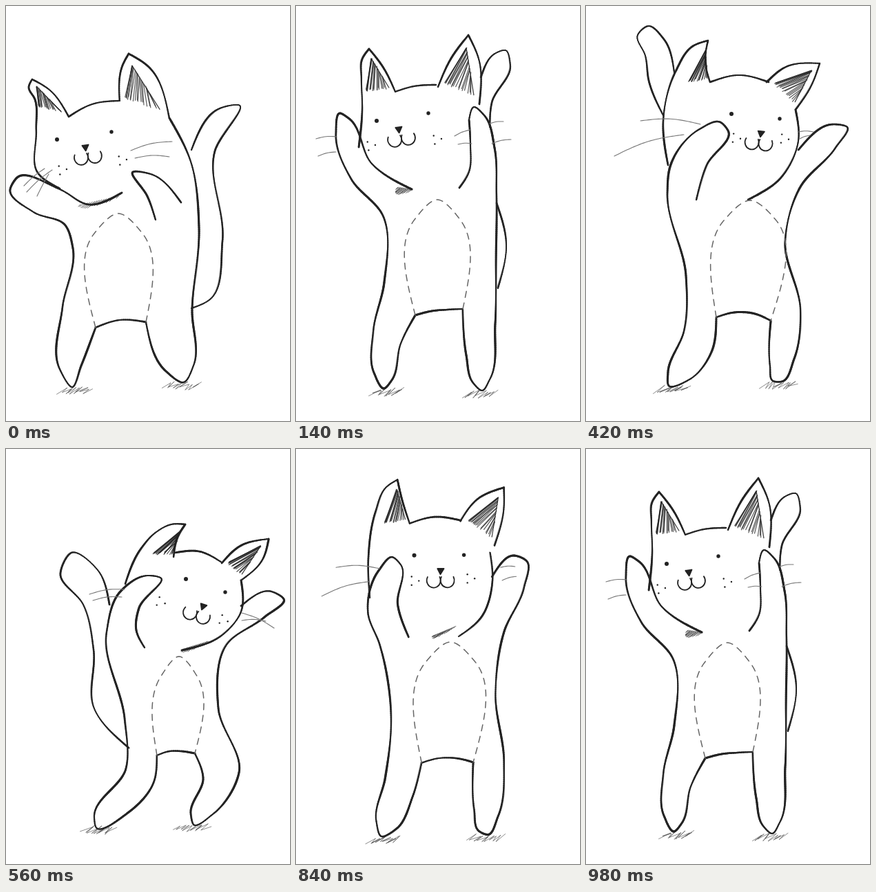
An HTML page with a canvas for the animation above (1120 ms loop, 412 by 600 pixels).

```html
<!DOCTYPE html>
<html lang="en">
<head>
<meta charset="utf-8">
<title>Dancing cat</title>
<style>
html, body { margin: 0; width: 100%; height: 100%; overflow: hidden; background: #fff; }
canvas { display: block; width: 412px; height: 600px; filter: blur(.5px); }
</style>
</head>
<body>
<canvas id="stage" width="412" height="600"></canvas>
<script>
const ctx = document.getElementById('stage').getContext('2d');
const STEP = 140;
const ORDER = [0, 1, 2, 3, 4, 3, 2, 1];
const INK = '#222';

// Key points "x,y"; strokes are separated by "|".
// head: cheek, ear, crown, ear, ear, jaw; left: crotch, then leg and arm
const leanLeft = pose({
  head: '78,264 46,241 44,180 42,135 33,117 38,106|38,106 64,122 91,160|91,160 125,142 165,137|165,137 169,86 178,69|178,69 207,88 237,162',
  left: '203,457 165,454 130,465|130,465 109,520 96,551 78,525 82,435 97,350 86,317 40,298 6,265 15,249 78,265 120,287 168,270',
  right: '237,162 268,225 280,320 270,440 272,520 258,544 232,528 203,457|217,309 205,275 184,240 210,243 254,284',
  tail: '269,208 310,148 337,143 303,210 314,340 295,425 269,437',
  whiskers: '56,235 26,260|67,237 30,269|62,243 45,275|181,209 241,196|187,220 237,218',
  eyes: '74,193 153,182', freckles: '81,237 168,223', mouth: '117,204',
  ear: '43,148', chin: '108,287 163,275', belly: '163,300'
});
const upright = pose({
  head: '91,204 96,150 95,105 96,77 106,62|106,62 126,88 144,124|144,124 172,116 203,114|206,117 226,74 250,42|250,42 266,80 266,142|251,165 253,200 251,240 237,263',
  left: '242,438 220,439 197,441 173,447|173,447 152,488 139,541 128,553 113,530 112,470 128,400 126,303 80,250 58,185 64,155 76,162 110,228 168,265',
  right: '242,438 247,505 257,545 270,556 281,540 289,460 290,370 291,270 288,205 273,158 258,146 251,165',
  tail: '268,103 290,68 304,64 311,85 284,140 281,175|291,285 305,345 293,408',
  whiskers: '29,192 59,189|32,217 58,211|281,170 301,167|284,199 312,193|230,188 253,179|235,200 255,199',
  eyes: '117,166 192,155', freckles: '108,202 204,193', mouth: '151,178',
  ear: '96,130', chin: '148,262 168,265', belly: '205,280'
});
const leanRight = pose({
  head: '119,230 112,165 130,95 155,58 177,50|177,50 173,76 180,110|180,110 222,100 265,110|262,110 290,88 339,83|339,83 326,117 304,150|304,150 308,195 284,247 235,280',
  left: '268,455 245,445 215,443 189,450|189,450 182,500 150,540 120,549 119,530 142,470 145,390 118,270 122,232 165,178 195,168 206,180 175,230 160,280',
  right: '268,455 267,520 271,542 284,543 302,510 311,440 289,340 310,263 362,205 379,175 360,171 308,208',
  tail: '112,158 91,108 86,72 75,42 90,29 113,48 128,96',
  whiskers: '79,166 166,171|41,217 142,186|308,182 330,182|310,192 325,187',
  eyes: '211,156 281,163', freckles: '217,191 287,192', mouth: '252,184',
  ear: '142,116', chin: '238,278 278,254', belly: '238,281'
});
const crouch = pose({
  head: '173,195 195,145 218,120 240,109 260,109|260,109 249,127 243,156|245,150 280,148 313,164|313,165 340,140 381,130|381,130 372,160 341,190|341,190 341,235 315,268 255,291',
  left: '274,440 255,437 237,437 219,443|219,443 215,480 178,525 130,546 128,533 174,462 172,390 146,265 165,207 205,183 224,186 193,230 189,262 201,287',
  right: '274,440 286,475 268,528 272,543 300,528 338,468 308,375 320,283 375,243 403,217 385,206 341,227',
  tail: '178,432 128,375 127,290 112,225 79,180 95,150 133,175 150,225',
  whiskers: '121,210 172,203|126,219 168,214|342,237 389,259|342,248 377,249',
  eyes: '261,188 318,207', freckles: '224,221 315,247', mouth: '281,226',
  ear: '205,156', chin: '257,289 293,278', belly: '251,300'
});
const POSES = [leanLeft, upright, stretchUp(upright, leanRight), leanRight, crouch];

function pose(keys) {
  const out = {};
  for (const k in keys) {
    out[k] = keys[k].split('|').map(s => s.split(' ').map(p => p.split(',').map(Number)));
  }
  return out;
}

// Halfway pose, taller, with the tail hidden behind the body
function stretchUp(a, b) {
  const out = {};
  for (const k in b) {
    out[k] = b[k].map((s, i) => s.map((p, j) => {
      const [x, y] = mix((a[k][i] || s)[j] || p, p, 0.58);
      return [x, y + (y - 320) * 0.04];
    }));
  }
  out.tail = [];
  return out;
}

let seed = 1;
function jit(a) {
  seed = (seed * 16807) % 2147483647;
  return (seed / 2147483647 - 0.5) * a;
}
function mix(p, q, t) {
  return [p[0] + (q[0] - p[0]) * t, p[1] + (q[1] - p[1]) * t];
}
const shake = (p, a) => [p[0] + jit(a), p[1] + jit(a)];

// Hermite curve with tangents weighted by chord length
function smooth(pts) {
  const last = pts.length - 1;
  const len = i => Math.hypot(pts[i + 1][0] - pts[i][0], pts[i + 1][1] - pts[i][1]) || 1;
  const slope = (i, k) => (pts[i + 1][k] - pts[i][k]) / len(i);
  const tan = (i, k) => {
    if (last > 1 && i === 0) return 1.5 * slope(0, k) - 0.5 * tan(1, k);
    if (last > 1 && i === last) return 1.5 * slope(last - 1, k) - 0.5 * tan(last - 1, k);
    const a = len(i - 1), b = len(i);
    return (slope(i - 1, k) * b + slope(i, k) * a) / (a + b);
  };
  const out = [pts[0]];
  for (let i = 0; i < last; i++) {
    const d = len(i), n = Math.ceil(d / 3);
    for (let j = 1; j <= n; j++) {
      const t = j / n, u = 1 - t;
      out.push([0, 1].map(k =>
        pts[i][k] * u * u * (1 + 2 * t) + pts[i + 1][k] * t * t * (3 - 2 * t) +
        d * t * u * (tan(i, k) * u - tan(i + 1, k) * t)));
    }
  }
  return out;
}

function line(pts, width, color) {
  ctx.lineWidth = width;
  ctx.strokeStyle = color;
  ctx.beginPath();
  pts.forEach(p => ctx.lineTo(p[0], p[1]));
  ctx.stroke();
}

// Pencil contour: swelling width with a faint second pass
function ink(strokes, width) {
  for (const s of strokes) {
    const pts = smooth(s), phase = jit(6);
    for (let i = 1; i < pts.length; i++) {
      line([pts[i - 1], pts[i]], width * (1 + 0.2 * Math.sin(i * 0.13 + phase)), INK);
    }
    line(pts.map((p, i) => {
      const w = 1.2 * Math.sin(i * 0.09 + phase);
      return [p[0] + w, p[1] + w * 0.5];
    }), 1.2, 'rgba(40,40,40,.6)');
  }
}

// Inner ear: the triangle pulled to its middle, shaded densest on one side
function innerEar(base, tip, end) {
  const mid = mix(base, mix(tip, end, 0.5), 2 / 3);
  const [a, t, b] = [base, tip, end].map(p => mix(p, mid, 0.32));
  line([a, t, b], 1.3, '#444');
  for (let i = 0; i < 18; i++) {
    const s = (i / 18) ** 1.5;
    line([shake(mix(t, b, s * 0.7), 2), shake(mix(a, b, s), 4)], 1.2, 'rgba(35,35,35,.75)');
  }
}

function chinShade([from, to]) {
  for (let i = 0; i <= 16; i++) {
    const p = mix(from, to, i / 16), d = 3 + 8 * Math.sin(i / 16 * Math.PI);
    line([p, [p[0] - d, p[1] + d * 0.8 + jit(3)]], 1, 'rgba(35,35,35,.7)');
  }
}

function groundShade(leg, left, right) {
  const foot = leg.reduce((a, b) => (b[1] > a[1] ? b : a));
  const pts = [];
  for (let i = 0; i <= 8; i++) {
    const x = foot[0] + left + (right - left - 14) * i / 8, y = foot[1] + 5;
    pts.push([x + jit(5), y + 4 + jit(5)], [x + 14 + jit(5), y - 4 + jit(5)]);
  }
  line(pts, 0.9, 'rgba(60,60,60,.65)');
}

function dot(p, r) {
  ctx.fillStyle = INK;
  ctx.beginPath();
  ctx.arc(p[0], p[1], r, 0, 7);
  ctx.fill();
}

function face(p) {
  const [l, r] = p.eyes[0], [x, y] = p.mouth[0][0];
  const tilt = Math.atan2(r[1] - l[1], r[0] - l[0]);
  dot(l, 3);
  dot(r, 2.7);
  for (const c of p.freckles[0]) {
    for (let i = 0; i < 3; i++) {
      const a = i * 2.1 + tilt;
      dot([c[0] + 7 * Math.cos(a), c[1] + 7 * Math.sin(a)], 1.2);
    }
  }
  ctx.save();
  ctx.translate(x, y);
  ctx.rotate(tilt);
  ctx.lineWidth = 1.8;
  ctx.strokeStyle = INK;
  for (const side of [-10, 10]) {
    ctx.beginPath();
    ctx.ellipse(side, 14, 10, 10.5, 0, -0.5, Math.PI + 0.5);
    ctx.stroke();
  }
  const n = tilt * 15;
  line([[n - 4, -3], [n + 5, -3], [n, 5], [n - 4, -3]], 2, INK);
  ctx.fill();
  ctx.restore();
}

function belly(p) {
  const [x, y] = p.belly[0][0], crotch = p.left[0];
  const right = crotch[0], left = crotch[crotch.length - 1];
  const half = (right[0] - left[0]) * 0.47;
  ctx.setLineDash([9, 8]);
  line(smooth([left, [x - half, y + 28], [x, y], [x + half, y + 28], right]), 1.5, '#666');
  ctx.setLineDash([]);
}

function draw(index) {
  const p = POSES[index], h = p.head;
  seed = 97 + index * 31;
  ctx.fillStyle = '#fff';
  ctx.fillRect(0, 0, 412, 600);
  ctx.lineCap = ctx.lineJoin = 'round';

  groundShade(p.left[1], -20, 30);
  groundShade(p.right[0], -31, 25);
  innerEar(p.ear[0][0], h[1][0], h[1][2]);
  innerEar(h[3][0], h[4][0], h[4][2]);
  chinShade(p.chin[0]);
  ink(p.tail, 2.2);
  ink(h, 2.4);
  ink(p.left, 2.6);
  ink(p.right, 2.6);
  for (const [a, b] of p.whiskers) {
    const mid = mix(a, b, 0.5);
    mid[1] -= Math.abs(b[0] - a[0]) * 0.06;
    line(smooth([a, mid, b]), 1.1, '#777');
  }
  belly(p);
  face(p);
}

let shown = -1;
function tick() {
  const next = ORDER[Math.floor(performance.now() / STEP) % ORDER.length];
  if (next !== shown) draw(shown = next);
  requestAnimationFrame(tick);
}
tick();
</script>
</body>
</html>
```
